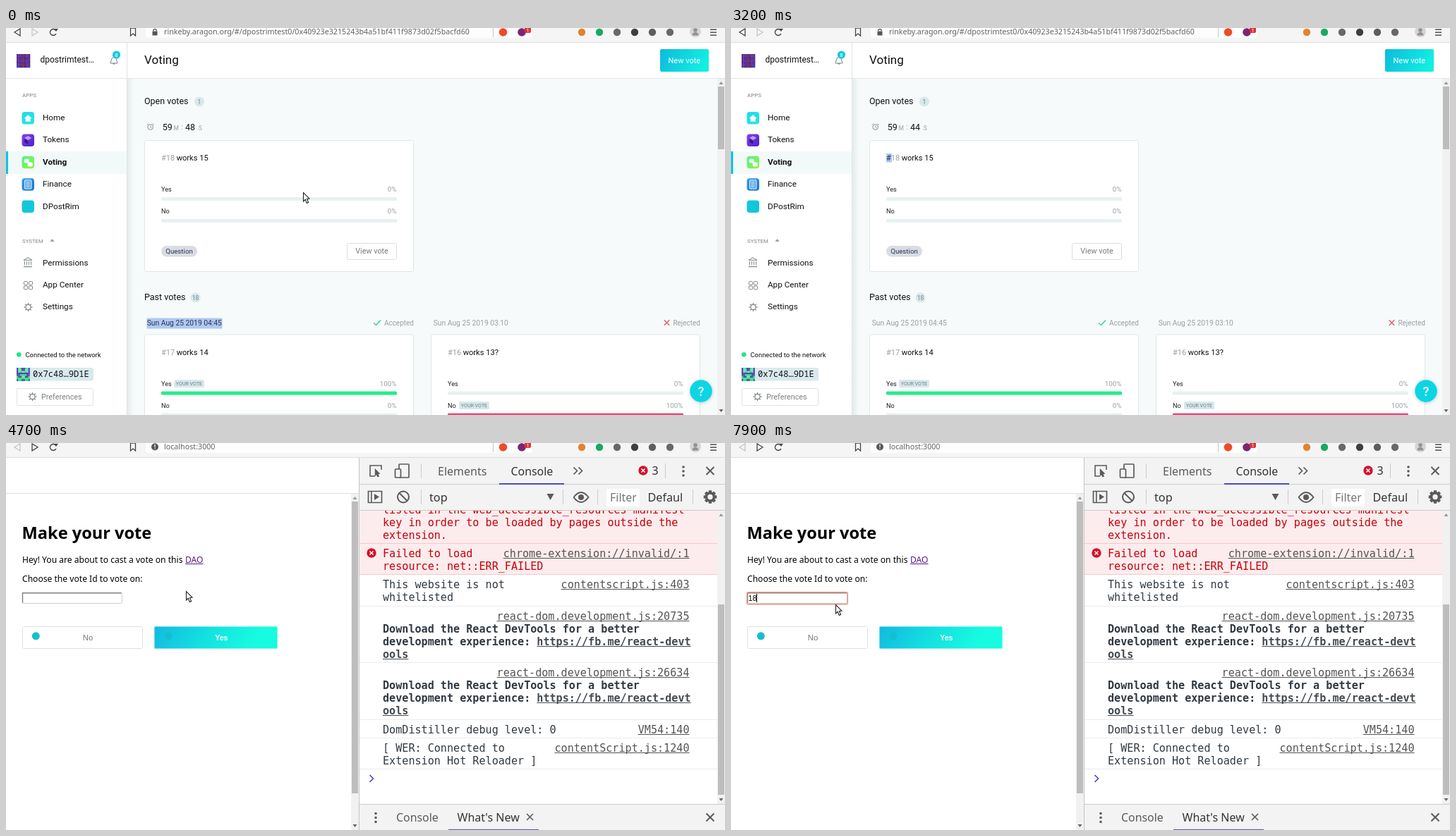
Animation of 1019x549 px, one loop 8 s. Source, as an HTML page with a canvas:

```html
<!DOCTYPE html>
<html lang="en">
<head>
<meta charset="utf-8">
<title>Casting a vote</title>
<style>
html, body { margin: 0; width: 100%; height: 100%; overflow: hidden; background: #fff; }
canvas { display: block; }
</style>
</head>
<body>
<canvas id="stage" width="1019" height="549"></canvas>
<script>
const c = document.getElementById('stage').getContext('2d');
const SANS = 'Roboto, sans-serif';
const UI = '"Noto Sans", "Open Sans", sans-serif';
const MONO = '"DejaVu Sans Mono", monospace';
const ARIAL = '"Liberation Sans", Arial, sans-serif';
const LOOP = 8000, STEP = 100, CUT = 3400, TRAVEL = 400;
const BLACK = '#111', GREY = '#9a9fa0', LINE = '#e2e6e6', SELECT = '#b0c8f2';
const INK = '#5a5a5a', DARK = '#333', ACCENT = '#4c49cb', CYAN = '#14bfd0';

function paint(fill, edge, lw = 1) {
  if (fill) { c.fillStyle = fill; c.fill(); }
  if (edge) { c.strokeStyle = edge; c.lineWidth = lw; c.stroke(); }
}

function rect(x, y, w, h, col) { c.fillStyle = col; c.fillRect(x, y, w, h); }

function box(x, y, w, h, r, ...style) {
  c.beginPath();
  c.roundRect(x, y, w, h, r);
  paint(...style);
}

function arc(x, y, r, from, to, ...style) {
  c.beginPath();
  c.arc(x, y, r, from, to);
  paint(...style);
}
const disc = (x, y, r, ...style) => arc(x, y, r, 0, 7, ...style);

// Points are a flat list of x, y offsets from the origin.
function shape(ox, oy, pts, closed, ...style) {
  c.beginPath();
  for (let i = 0; i < pts.length; i += 2) c.lineTo(ox + pts[i], oy + pts[i + 1]);
  if (closed) c.closePath();
  paint(...style);
}
const stroke = (x, y, pts, col, lw) => shape(x, y, pts, false, null, col, lw);

// Triangle, chevron or tick pointing along the angle a.
function wedge(x, y, len, half, a, closed, ...style) {
  c.save();
  c.translate(x, y);
  c.rotate(a);
  shape(0, 0, [-len, -half, len, 0, -len, half], closed, ...style);
  c.restore();
}
const UP = -Math.PI / 2, DOWN = Math.PI / 2;
const chevron = (x, y, col) => wedge(x, y, 2.5, 5, 0, false, null, col, 1.7);

function text(s, x, y, px, col, { f = SANS, w = 400, a = 'left', u } = {}) {
  c.font = `${w} ${px}px ${f}`;
  c.textAlign = a;
  c.fillStyle = col;
  c.fillText(s, x, y);
  const len = c.measureText(s).width;
  if (u) rect(a === 'right' ? x - len : x, Math.round(y) + 1, len, 1, col);
  return x + len;
}
const ui = (s, x, y, px, col, o) => text(s, x, y, px, col, { f: UI, ...o });
const mid = (s, x, y, px, col, o) => text(s, x, y, px, col, { a: 'center', ...o });
const end = (s, x, y, px, col) => text(s, x, y, px, col, { a: 'right' });

function blend(x, y, w, h, ...cols) {
  const g = c.createLinearGradient(x, y, x + w, y + h);
  cols.forEach((k, i) => g.addColorStop(i / (cols.length - 1), k));
  return g;
}

function cross(x, y, r, col, lw = 1.5) {
  stroke(x, y, [-r, -r, r, r], col, lw);
  stroke(x, y, [r, -r, -r, r], col, lw);
}

function gear(x, y, r, col, lw) {
  disc(x, y, r * 0.6, null, col, lw);
  for (let i = 0; i < 8; i++) {
    const p = Math.cos(i * Math.PI / 4) * r, q = Math.sin(i * Math.PI / 4) * r;
    stroke(x, y, [p * 0.65, q * 0.65, p, q], col, lw * 1.1);
  }
}

function scrollbar(x, top, bottom, from, to) {
  rect(x, top, 11, bottom - top, '#f1f1f1');
  rect(x + 1, from, 9, to - from, '#bdbdbd');
  wedge(x + 5.5, top + 6, 2, 3, UP, true, '#999');
  wedge(x + 5.5, bottom - 6, 2, 3, DOWN, true, '#666');
}

// Mirrored pattern of blocks from a seed.
function identicon(x, y, size, seed, cols) {
  const n = 8, d = size / n;
  for (let i = 0; i < n * n / 2; i++) {
    seed = seed * 16807 % 2147483647;
    const col = cols[seed % cols.length], k = i % 4, row = y + (i >> 2) * d;
    rect(x + k * d, row, d + 0.3, d + 0.3, col);
    rect(x + (n - 1 - k) * d, row, d + 0.3, d + 0.3, col);
  }
}

function browserBar(local) {
  const ink = '#444', off = '#c4c4c4';
  rect(0, 0, 1019, 21, '#f5f5f5');
  box(198, -10, 548, 24, 4, '#fdfdfd');
  rect(0, 20, 1019, 1, '#dedede');
  wedge(16, 6, 4, 5, Math.PI, true, null, local ? off : ink, 1.3);
  wedge(41, 6, 4, 5, 0, true, null, local ? ink : off, 1.3);
  arc(67, 6, 4.5, 0.5, 5.6, null, ink, 1.5);
  wedge(71, 3, 2, 3, DOWN, true, ink);
  shape(180, 6, [-3.5, -6, 3.5, -6, 3.5, 5, 0, 2, -3.5, 5], true, null, ink, 1.3);
  if (local) {
    disc(211, 5.5, 5, '#555');
    mid('!', 211, 9, 9, '#fff', { w: 700 });
  } else {
    rect(207.5, 4.5, 7, 6, '#555');
    arc(211, 4, 2.3, Math.PI, 0, null, '#555', 1.3);
  }
  ui(local ? 'localhost:3000'
    : 'rinkeby.aragon.org/#/dpostrimtest0/0x40923e3215243b4a51bf411f9873d02f5bacfd60',
    224, 9.3, 10.7, '#626262');
  rect(690, 0, 1, 13, '#c8c8c8');
  disc(704.5, 6, 5.8, '#ee4a26');
  disc(731, 6, 5.8, '#7a2672');
  box(735, -3, 9, 10, 2, '#e0303a');
  mid('1', 739.5, 5.5, 7.5, '#fff');
  ['#e5822d', '#18a866', '#66696c', '#3b4043', '#5c5f61', '#66696c'].forEach((col, i) =>
    disc(816 + i * 25, 6, 5.2, col));
  disc(977, 5, 8, '#d5d5d5');
  disc(977, 3, 2.8, '#929292');
  arc(977, 10.5, 4.5, Math.PI, 0, '#929292');
  for (let i = 0; i < 3; i++) rect(998, 1.5 + i * 4, 9, 1.4, ink);
}

const APPS = [
  ['Home', '#20d9ef', '#23e7df', (x, y) => {
    wedge(x, y - 2, 2.5, 5.5, UP, true, '#fff');
    rect(x - 3.5, y, 7, 5, '#fff');
  }],
  ['Tokens', '#8143ee', '#4d24c7', (x, y) => {
    shape(x, y, [0, -6, 5, -3, 0, 0, -5, -3], true, '#baa4ff');
    shape(x, y, [-5, -2, 0, 1, 0, 6, -5, 3], true, '#3614a0');
  }],
  ['Voting', '#4ff28e', '#97ef46', (x, y) => {
    box(x - 5.5, y - 5, 7, 6, 2, '#e6ffe9');
    box(x - 0.5, y, 7, 6, 2, '#fff');
  }],
  ['Finance', '#2f9de8', '#2379d0', (x, y) => {
    box(x - 4.5, y - 6, 9, 12, 1, null, '#e8f5ff', 1.2);
    for (let i = 0; i < 4; i++) rect(x - 3, y - 4 + i * 2.3, 6, 1.2, '#e8f5ff');
  }],
  ['DPostRim', '#13c6dc', '#13c6dc', () => {}]
];

function sidebar() {
  const pitch = 31.4, ink = '#7d8487';
  rect(0, 21, 171, 528, '#fff');
  rect(172, 72, 9, 477, blend(172, 0, 9, 0, '#e4ebec', '#f6fafa'));
  rect(171, 21, 1, 528, '#dfe5e6');
  rect(0, 71, 172, 1, LINE);
  identicon(15, 37, 19, 4127, ['#5b2c8d', '#4338c4', '#672461']);
  text('dpostrimtest…', 48.5, 49, 12, BLACK);
  arc(153, 45, 3.5, Math.PI, 0, null, ink);
  shape(153, 45, [-3.5, 0, -5, 5, 5, 5, 3.5, 0], false, null, ink);
  arc(153, 50, 1.8, 0, Math.PI, ink);
  disc(156.5, 38, 5.6, '#12cbe0');
  mid('8', 156.5, 41, 8, '#fff');

  text('APPS', 23, 98, 8, ink);
  rect(0, 175, 171, 32, '#f2f9f9');
  rect(0, 175, 3, 32, '#08c9df');
  APPS.forEach(([name, from, to, glyph], i) => {
    const y = 119 + i * pitch;
    box(22.5, y, 17.5, 17.5, 4, blend(22, y, 17, 17, from, to));
    glyph(31.2, y + 8.7);
    text(name, 52, y + 12, 11.7, BLACK, { w: name === 'Voting' ? 700 : 400 });
  });

  text('SYSTEM', 23, 304.5, 7.8, ink);
  wedge(65.5, 301, 2, 3, UP, true, GREY);
  wedge(31, 327.5, 1.8, 6, UP, true, null, ink);
  for (let i = 0; i < 4; i++) {
    rect(26 + i * 3, 331, 1, 5, ink);
    box(25.5 + i % 2 * 7, 359.5 + (i >> 1) * 6.5, 5, 4.8, 1, null, ink);
  }
  rect(25, 338, 12, 1.2, ink);
  gear(31.5, 396, 6, ink, 1.2);
  ['Permissions', 'App Center', 'Settings'].forEach((s, i) =>
    text(s, 52, 336.5 + i * pitch, 11.7, BLACK));

  disc(18.3, 463.3, 3.3, '#20e58a');
  text('Connected to the network', 27.5, 466.7, 9.4, BLACK);
  box(15, 482, 109, 18.5, 3, '#d9e9ee');
  identicon(15, 482, 18.5, 907, ['#32e67c', '#5a3fb5', '#6ce8b4', '#32e67c']);
  text('0x7c48…9D1E', 38, 495, 12.1, BLACK, { f: '"Noto Sans Mono", monospace' });
  box(15.5, 511.5, 108, 24, 2, '#fff', '#dfe1e1');
  gear(37.5, 523, 6, ink, 1.2);
  text('Preferences', 50, 526.7, 10.8, '#7a7f82');
}

function tag(x, y) {
  box(x, y, 43, 11, 2, '#d8e8eb');
  mid('YOUR VOTE', x + 21.5, y + 8.3, 7.1, '#668088');
}

function option(name, share, x, y, hue, mine) {
  text(name, x, y, 9.2, '#222');
  end(share + '%', x + 333.5, y, 9.8, GREY);
  box(x, y + 8, 334, 5, 1.5, share ? hue : '#e8f1f1');
  if (mine) tag(x + (name === 'Yes' ? 18 : 16), y - 8.5);
}

function card(x, y, num, title, yes, no) {
  box(x + 0.5, y + 0.5, 381, 186, 2, '#fff', '#dfe6e7');
  text(num, x + 24, y + 29, 11, GREY);
  text(title, x + 45.7, y + 29, 11.1, BLACK);
  option('Yes', yes, x + 24, y + 73, '#22ee8a', yes);
  option('No', no, x + 24, y + 104, '#e84a76', no);
}

function heading(s, count, x, y) {
  text(s, 196, y, 12.5, BLACK);
  disc(x, y - 3.5, 7, '#d9e8eb');
  mid(count, x, y - 0.3, 8.5, '#6e858d');
}

function countdown(t) {
  disc(204.7, 140.5, 3.8, null, '#858b8e');
  stroke(204.7, 140.5, [0, -2, 0, 0.5, 2, 0.5], '#858b8e', 0.8);
  for (const s of [-1, 1]) stroke(204.7, 140.5, [s * 5, -3, s * 3, -5], '#858b8e');
  text('59', 221.7, 145, 12.5, BLACK);
  text('M', 237.5, 145, 8.5, GREY);
  text(':', 248, 144, 11, GREY);
  text(48 - Math.floor((t + 800) / 1000), 254, 145, 12.5, BLACK);
  text('S', 272.7, 145, 8.5, GREY);
}

function votingPage(t) {
  rect(0, 21, 1019, 528, '#f6fafa');
  rect(172, 21, 847, 50, '#fff');
  rect(172, 71, 847, 1, LINE);
  sidebar();
  text('Voting', 196, 50.5, 17, BLACK);
  box(927, 30, 69, 32, 2, blend(927, 30, 60, 32, '#0cbbdc', '#12f0e1'));
  mid('New vote', 961.3, 49.5, 11, '#fff');

  heading('Open votes', 1, 274, 108);
  countdown(t);
  card(196, 159, '#18', 'works 15', 0, 0);
  if (t >= 2600) {
    rect(220, 178, 8, 12.5, SELECT);
    text('#', 220, 188, 11, '#1d2c50');
  }
  box(220, 309, 51, 15.5, 7.7, '#d9dde3');
  mid('Question', 245.5, 320.2, 9.7, '#2a3152');
  box(483.5, 305.5, 70, 23, 2, '#fff', '#dcdfdf');
  mid('View vote', 518.5, 320.3, 10.8, '#757a7d');

  heading('Past votes', 18, 268.5, 386);
  const picked = t < 2400;
  if (picked) rect(199.5, 411.5, 107, 15, SELECT);
  text('Sun Aug 25 2019 04:45', 199.7, 422.3, 10.3, picked ? '#263452' : GREY);
  text('Sun Aug 25 2019 03:10', 605.7, 422.3, 10.3, GREY);
  stroke(526, 418, [-5, 0.5, -1.5, 3.5, 5, -3.5], '#35d693', 1.6);
  end('Accepted', 578, 422.3, 10, GREY);
  cross(936.5, 418, 3.7, '#e35b70');
  end('Rejected', 984, 422.3, 10, GREY);
  card(196, 434.5, '#17', 'works 14', 100, 0);
  card(602, 434.5, '#16', 'works 13?', 0, 100);

  scrollbar(1008, 72, 549, 83, 172);
  c.save();
  c.shadowColor = 'rgba(0,60,70,.25)'; c.shadowBlur = 5; c.shadowOffsetY = 1;
  disc(985, 515, 15.7, '#0bd6e4');
  c.restore();
  mid('?', 985, 521.5, 18, '#fff', { w: 500 });
}

function voteInput(t) {
  const focus = t >= 5300;
  const typed = '18'.slice(0, t < 6200 ? 0 : t < 6700 ? 1 : 2);
  box(23.5, 212.5, 141, 15, 2, '#fff', '#cfcfcf');
  stroke(23.5, 212.8, [0, 14, 0, 0, 140, 0], '#808080', 1.4);
  if (focus) box(22.7, 211.7, 142.6, 17, 2, null, '#e4957f', 1.4);
  const caretX = text(typed, 24.5, 224, 10.8, '#000', { f: ARIAL });
  const blink = t >= 5800 && t < 6200 || t >= 7300 && t < 7900;
  if (focus && !blink) rect(Math.floor(caretX), 214, 1, 12, '#000');
}

function castPage(t) {
  rect(0, 21, 501, 528, '#fff');
  rect(0, 71, 501, 1, '#dedede');
  ui('Make your vote', 22.5, 135.5, 23.6, '#000', { w: 700 });
  ui('Hey! You are about to cast a vote on this', 23, 170, 12.1, '#000');
  ui('DAO', 254, 170, 12.1, '#551a8b', { u: true });
  ui('Choose the vote Id to vote on:', 23, 196.5, 12.1, '#000');
  voteInput(t);

  box(23.5, 260.5, 170, 31, 2, '#fff', '#dfe2e2');
  mid('No', 116, 279.7, 11.2, '#757575', { f: ARIAL });
  box(210, 260, 175, 32, 2, blend(225, 245, 110, 65, '#12bce0', '#14e0e0', '#17fbe1'));
  box(210.5, 260.5, 174, 31, 2, null, 'rgba(255,255,255,.4)');
  mid('Yes', 305.3, 279.7, 10.6, '#fff', { f: ARIAL, w: 700 });
  for (const x of [42.3, 230]) disc(x, 273.8, 5.5, CYAN);
  scrollbar(489, 72, 549, 83, 497);
}

function badMark(x, y) {
  disc(x, y, 6.7, '#d3122b');
  cross(x, y, 2.5, '#fff');
}

// Each entry: link on the right, then its lines; text after a bar is underlined.
const reactTip = n => ['react-dom.development.js:' + n, '',
  'Download the React DevTools for a better',
  'development experience: |https://fb.me/react-devt', '|ools'];
const LOG = [
  ['', 'listed in the web_accessible_resources manifest',
    'key in order to be loaded by pages outside the', 'extension.'],
  ['chrome-extension://invalid/:1', 'Failed to load', 'resource: net::ERR_FAILED'],
  ['contentscript.js:403', 'This website is not', 'whitelisted'],
  reactTip(20735),
  reactTip(26634),
  ['VM54:140', 'DomDistiller debug level: 0'],
  ['contentScript.js:1240', '[ WER: Connected to', 'Extension Hot Reloader ]']
];

function consoleLog() {
  const px = 15.12, row = 18, pad = 8.4;
  let top = 80.6;
  c.save();
  c.beginPath(); c.rect(501, 96, 518, 416); c.clip();
  rect(501, 96, 518, 416, '#fff');
  LOG.forEach(([link, ...lines], i) => {
    const error = i < 2, next = top + lines.length * row + pad;
    const base = Math.round(top + 19), w = lines[0] ? 400 : 700;
    if (error) rect(501, Math.round(top), 507, Math.round(next) - Math.round(top), '#fdeced');
    rect(501, Math.round(next) - 1, 507, 1, error ? '#f3c9cb' : '#ececec');
    text(link, 968.5, base, px, '#545454', { f: MONO, a: 'right', u: true });
    lines.forEach((s, j) => {
      const [plain, url = ''] = s.split('|'), y = base + j * row;
      const x = text(plain, 534, y, px, error ? '#c5000b' : '#303942', { f: MONO, w });
      text(url, x, y, px, '#454c52', { f: MONO, w, u: true });
    });
    top = next;
  });
  badMark(518, 156);
  chevron(518, 476, ACCENT);
  scrollbar(1008, 96, 512, 229, 499);
  c.restore();
}

function devTools() {
  const dots = (x, y) => { for (let i = -1; i < 2; i++) disc(x, y + i * 6, 1.8, INK); };
  rect(501, 21, 518, 528, '#f3f3f3');
  consoleLog();
  rect(500, 21, 1, 528, '#c4c4c4');
  for (const y of [58, 95, 512]) rect(501, y, 518, 1, '#cbcbcb');
  for (const x of [588, 934]) rect(x, 29, 1, 21, '#cbcbcb');
  for (const x of [588, 789, 838, 973]) rect(x, 66, 1, 21, '#cbcbcb');

  stroke(524, 40, [-1, 7, -8, 7, -8, -8, 8, -8, 8, -2], INK, 1.6);
  arrow(523, 37, INK, INK, 0.7);
  box(557, 30, 14, 19, 1, null, INK, 1.7);
  box(551.5, 37, 8, 12, 1, '#f3f3f3', INK, 1.7);
  ui('Elements', 612, 45.5, 16, INK);
  ui('Console', 715.5, 45.5, 15.9, DARK);
  rect(699, 57, 92, 2, ACCENT);
  chevron(807, 39.5, INK);
  chevron(814, 39.5, INK);
  badMark(903, 39);
  ui('3', 915.5, 45, 15.9, DARK);
  dots(960, 40);
  cross(998, 39.5, 5.5, INK, 2);

  box(513.5, 68.5, 19, 16, 0, null, INK, 1.7);
  rect(517, 68.5, 1.6, 16, INK);
  wedge(525.5, 76.5, 3.5, 4.5, 0, true, INK);
  disc(563, 76.5, 8, null, INK, 2);
  stroke(563, 76.5, [-5.5, -5.5, 5.5, 5.5], INK, 2);
  ui('top', 600, 82.5, 16.2, DARK);
  wedge(771.5, 76.5, 4.5, 5, DOWN, true, INK);
  c.beginPath();
  c.moveTo(804.5, 77);
  c.quadraticCurveTo(815, 63, 825.5, 77);
  c.quadraticCurveTo(815, 91, 804.5, 77);
  paint(null, INK, 2);
  disc(815, 77, 4, INK);
  rect(851, 65, 47, 25, '#fff');
  c.save();
  c.beginPath(); c.rect(851, 65, 42.5, 25); c.clip();
  ui('Filter', 856, 82.5, 16, '#777');
  c.restore();
  ui('Defaul', 909.5, 82.5, 16.2, DARK);
  gear(998, 76.5, 9.3, INK, 3.8);

  dots(524, 531.5);
  ui('Console', 553, 537, 15.9, INK);
  ui("What's New", 639.5, 537, 16, DARK);
  cross(742.5, 530.5, 4.5, INK, 1.6);
  rect(627, 548, 128, 1, ACCENT);
  cross(998, 531, 5.5, INK, 2);
}

// Pointer stops: arrival time, x, y.
const STOPS = [
  [0, 421, 233], [700, 391, 223], [1300, 229, 179], [1700, 254, 162], [2200, 721, 190],
  [2800, 811, 3], [3100, 809, -20], [4000, 646, 8], [4400, 150, 300], [4700, 255, 210],
  [5000, 179, 210], [5300, 136, 219], [7900, 148, 229]
];

// Wait at a stop, then glide to the next one just in time.
function pointerAt(t) {
  const i = Math.max(1, STOPS.findIndex(s => s[0] >= t));
  const [left, x, y] = STOPS[i - 1], [due, u, v] = STOPS[i];
  const span = Math.min(TRAVEL, due - left);
  const p = Math.max(0, 1 - (due - t) / span), k = p * p * (3 - 2 * p);
  return [Math.round(x + (u - x) * k), Math.round(y + (v - y) * k)];
}

function arrow(x, y, fill, edge, size = 1) {
  const outline = [0.5, 0.5, 0.5, 13, 3.2, 10.3, 5.3, 15.5, 7.6, 14.5, 5.5, 9.5, 9, 9];
  shape(x, y, outline.map(v => v * size), true, fill, edge, 1.1);
}

function pointer(t) {
  const typing = t >= 6300 && t < 7400, away = t >= 3100 && t < 4000;
  if (typing || away) return;
  const [x, y] = pointerAt(t);
  if (t >= 5200 && t < 7700) {
    for (const s of [-5.5, 5.5]) stroke(x + 0.5, y + s, [-2.5, 0, 2.5, 0], '#000', 1.4);
    stroke(x + 0.5, y, [0, -5, 0, 5], '#000', 1.6);
  } else {
    arrow(x, y, '#fff', '#222');
  }
}

let last = -1;
function frame(now) {
  const t = Math.floor(now % LOOP / STEP) * STEP;
  if (t !== last) {
    last = t;
    if (t < CUT) votingPage(t);
    else { castPage(t); devTools(); }
    browserBar(t >= CUT);
    pointer(t);
  }
  requestAnimationFrame(frame);
}
requestAnimationFrame(frame);
</script>
</body>
</html>
```
